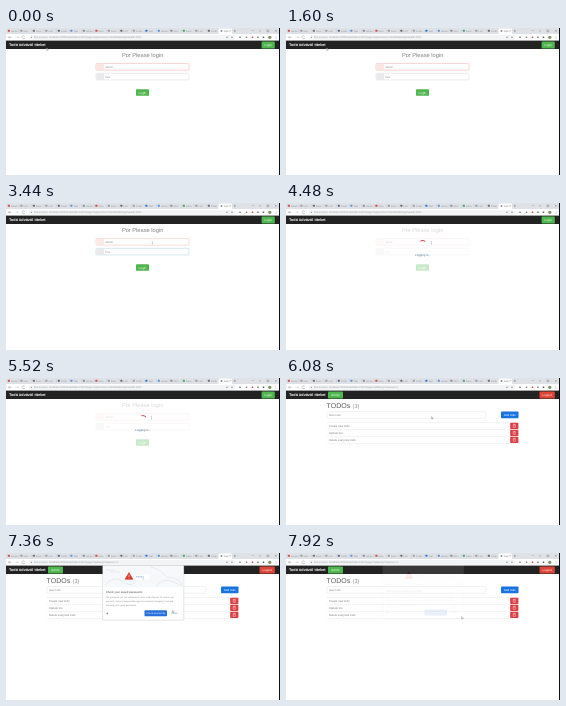
Write an HTML page that moves like this. It is 274 px wide and 147 px high and loops after 8 s.

```html
<!DOCTYPE html>
<html lang="en">
<head>
<meta charset="utf-8">
<title>Todo login</title>
<style>
html, body { margin: 0; width: 100%; height: 100%; overflow: hidden; background: #fff; }
svg { display: block; width: 100vw; height: 100vh; font-family: "Liberation Sans", Arial, sans-serif; text-rendering: geometricPrecision; }
</style>
</head>
<body>
<svg id="stage" viewBox="0 0 274 147"></svg>
<script>
const LOOP = 8000, STEP = 80;
const GREEN = '#4fb54f', RED = '#dc4538';
const stage = document.getElementById('stage');

const rect = (x, y, w, h, fill, more = '') =>
  `<rect x="${x}" y="${y}" width="${w}" height="${h}" fill="${fill}" ${more}/>`;
const dot = (x, y, r, fill, more = '') =>
  `<circle cx="${x}" cy="${y}" r="${r}" fill="${fill}" ${more}/>`;
const path = (d, color, width = 0.5, more = '') =>
  `<path d="${d}" fill="none" stroke="${color}" stroke-width="${width}" ${more}/>`;
const text = (x, y, size, fill, str, more = '') =>
  `<text x="${x}" y="${y}" font-size="${size}" fill="${fill}" ${more}>${str}</text>`;
const group = (id, body) => `<g id="${id}">${body}</g>`;
const mid = 'text-anchor="middle"';

function button(x, y, w, h, fill, label, size = 3) {
  return rect(x, y, w, h, fill, 'rx="0.9"') +
    text(x + w / 2, y + h / 2 + size * 0.36, size, '#fff', label, mid);
}

function browser() {
  const colors = ['#d64b40', '#9a9da2', '#6a6d72', '#9da2a8', '#5a6a80', '#5f93dc', '#8a8f95'];
  const labels = ['Home', 'Inbo', 'Docs', 'List', 'Code', 'Test'];
  let out = rect(0, 0, 274, 6, '#dee1e6') + rect(0, 6, 274, 7, '#fff');
  for (let i = 0; i < 17; i++) {
    const x = 1.9 + i * 12.5;
    const color = i === 11 ? '#3176d2' : i === 14 ? '#46a568' : colors[i % 7];
    out += rect(x, 1.7, 2, 2, color, 'rx="0.5"') +
      text(x + 3.2, 3.7, 2.4, '#8b9095', labels[i % 6]) +
      path(`M${x + 11.2} 1.3v3`, '#b4b8bd', 0.3);
  }
  out += rect(212.5, 0.6, 13.5, 5.8, '#fff', 'rx="1.2"') +
    dot(215.5, 2.9, 1, '#888d93') + text(217.5, 3.8, 2.4, '#777', 'Todo') +
    path('M223.6 2.1l1.4 1.4m0-1.4l-1.4 1.4', '#777', 0.35) +
    path('M227.7 2.9h2.2m-1.1-1.1v2.2', '#666', 0.4) +
    path('M246 2.2l.8 .8 .8-.8M253 2.9h2M261 2h1.8v1.8h-1.8zM269 2l1.8 1.8m0-1.8l-1.8 1.8', '#666', 0.35);
  out += path('M5.5 9.3h-3m1.2-1.2l-1.2 1.2 1.2 1.2', '#777', 0.4) +
    path('M9.4 9.3h3m-1.2-1.2l1.2 1.2-1.2 1.2', '#bbb', 0.4) +
    path('M18.8 8.5a1.4 1.4 0 1 0 .2 1.4', '#777', 0.4) +
    rect(23, 7, 206, 4.8, '#f1f3f4', 'rx="2.4"') + dot(25.4, 9.3, 0.6, '#888');
  out += group('urlLogin', text(28, 10.2, 2.65, '#9a9ea3',
      'Not secure | localhost:3000/todo/index.html?page=login&amp;return=/todo/list&amp;lang=hu&amp;id=1002')) +
    group('urlList', text(28, 10.2, 2.65, '#9a9ea3',
      'Not secure | localhost:3000/todo/index.html?page=list&amp;lang=hu&amp;user=1'));
  [[221, '#aaa'], [226, '#aaa'], [234, '#888'], [240.5, '#888'], [246.5, '#d8453d'], [252, '#777'], [257.5, '#555']]
    .forEach(([x, c]) => out += rect(x - 0.8, 8.5, 1.6, 1.6, c, 'rx="0.5"'));
  return out + dot(263.8, 9.3, 1.6, '#7c9264') +
    [8.2, 9.3, 10.4].map(y => dot(270, y, 0.3, '#666')).join('');
}

function navbar() {
  return rect(0, 12.6, 274, 8.4, '#222') +
    text(3, 18.4, 3.8, '#fff', 'Todó üdvözöl titeket', 'font-weight="bold"') +
    group('navLogin', button(255.6, 13.6, 13.2, 7, GREEN, 'Login')) +
    group('navUser', button(42, 13.6, 15, 7, GREEN, 'Admin') +
      button(253.5, 13.6, 15.3, 7, RED, 'Logout'));
}

function field(y, id, ghost, value) {
  return rect(90, y, 93, 6.6, '#fff', `id="${id}Box" stroke="#d8d8d8" stroke-width="0.5" rx="0.7"`) +
    rect(90.2, y + 0.2, 7.8, 6.2, '#eaeaec', `id="${id}Tag"`) +
    text(99.2, y + 4.3, 2.9, '#999', ghost, `id="${id}Hint"`) +
    text(99.2, y + 4.3, 2.9, '#888', value, `id="${id}Value"`);
}

function login() {
  return group('login',
    text(136.6, 28.8, 5.7, '#808080', 'Por Please login', mid) +
    field(35.6, 'user', 'admin', 'admin') + field(45.3, 'pass', 'Pas', '') +
    button(130, 61.2, 13, 6.6, GREEN, 'Login', 3.2) +
    group('busy', rect(0, 21, 274, 126, '#fff', 'opacity="0.7"') +
      path('M135.4 37.7a4.5 4.5 0 0 1 4.7 1.4', '#d33a3a', 0.9, 'id="spinner"') +
      text(137, 53.3, 2.9, '#48708f', 'Logging in...', mid)));
}

function list() {
  const items = ['Create new todo', 'Update me', 'Delete everyone todo'];
  let out = text(40.6, 29.6, 7, '#5c5c5c', 'TODOs') + text(66.6, 29.6, 5.5, '#8c8c8c', '(3)') +
    rect(41, 33.6, 159, 6.6, '#fff', 'stroke="#ddd" stroke-width="0.4" rx="0.6"') +
    text(43, 37.9, 2.8, '#888', 'New todo') +
    button(215, 33.4, 17.5, 6.8, '#1673e0', 'Add todo', 3);
  items.forEach((item, i) => {
    const y = 44.6 + i * 7;
    out += path(`M41 ${y}H232.5`, '#ddd', 0.35) + text(43, y + 4.4, 2.8, '#777', item) +
      rect(224.2, y + 0.2, 8.2, 6.3, '#dc3f43', 'rx="0.8"') +
      path(`M227.3 ${y + 2.4}h2v2.4h-2zM226.8 ${y + 1.8}h3`, '#fff', 0.4);
  });
  return group('list', out + path('M41 65.6H232.5', '#ddd', 0.35));
}

function popup() {
  const lines = [
    'The password you just used was found in a data breach. To secure your',
    'accounts, Velora Password Manager recommends changing it now and',
    'checking your saved passwords.'
  ];
  return group('popup',
    rect(96.2, 12.8, 82, 54.8, '#000', 'rx="1.5" opacity="0.1"') +
    rect(96.7, 12.4, 81, 54.5, '#fff', 'rx="1.2" stroke="#ccc" stroke-width="0.3"') +
    rect(97, 12.7, 80.4, 21.6, '#f7f8fa') +
    path('M99 32q9-10 17-4t12 2M145 14l8 3 8 7 8 1 8 6M150 33q8-9 18-4l9 4M100 17h9m-5 2h10', '#d5dae1', 0.5) +
    '<path d="M123 19.6l3.9 6.7h-7.8z" fill="#db372d" stroke="#db372d" stroke-width="0.6" stroke-linejoin="round"/>' +
    path('M123 21.7v2.3m0 .7v.7', '#fff', 0.6) +
    rect(128, 21.6, 16, 4.8, '#fff', 'rx="2.4"') +
    text(130, 26, 4.2, '#6284b8', '****|') +
    text(99.8, 39.6, 2.8, '#444', 'Check your saved passwords') +
    lines.map((s, i) => text(99.8, 45.2 + i * 3.9, 2.15, '#888', s)).join('') +
    dot(101.3, 60.4, 0.9, '#999') +
    button(138.5, 57.3, 22.5, 6, '#2770dc', 'Check passwords', 2.4) +
    text(168.2, 61.2, 2.4, '#557fc0', 'Close', mid));
}

stage.innerHTML = rect(0, 0, 274, 147, '#fff') + browser() + navbar() + login() + list() + popup() +
  '<path id="arrow" d="M0 0v2.4l.6-.5 .4 .8 .5-.2-.4-.8h.8z" fill="#fff" stroke="#444" stroke-width="0.25"/>' +
  path('M0 0v2.6m-.5 0h1m-1-2.6h1', '#777', 0.3, 'id="beam"') +
  rect(273, 0, 1, 147, '#111');

const el = id => document.getElementById(id);
const show = (id, on) => el(id).setAttribute('display', on ? 'inline' : 'none');
const set = (id, name, value) => el(id).setAttribute(name, value);
const ramp = (t, a, b) => Math.max(0, Math.min(1, (t - a) / (b - a)));
const ease = p => p * p * (3 - 2 * p);

// time, x, y
const moves = [[0, 40.5, 19.8], [2080, 40.5, 19.8], [2880, 146.4, 38.5], [3760, 146.4, 38.5],
  [4480, 145.4, 38.5], [6640, 145.4, 38.5], [7280, 166, 56], [7480, 167, 59], [7840, 175.5, 63.5], [8000, 175.5, 63.5]];

function pointer(t) {
  const i = moves.findIndex(m => m[0] > t);
  const a = moves[i - 1], b = moves[i];
  const p = ease(ramp(t, a[0], b[0]));
  return `translate(${a[1] + (b[1] - a[1]) * p} ${a[2] + (b[2] - a[2]) * p})`;
}

function draw(t) {
  const inside = t >= 5760, busy = t >= 4400, typed = t >= 2640;
  const overField = t >= 2800 && !inside;
  const chars = Math.floor(5 * ramp(t, 3680, 4240));
  show('login', !inside);
  show('navLogin', !inside);
  show('urlLogin', !inside);
  show('list', inside);
  show('navUser', inside);
  show('urlList', inside);
  show('busy', busy);

  set('userBox', 'stroke', typed ? '#eebcb8' : '#f2aaa6');
  set('userTag', 'fill', typed ? '#fbe9e8' : '#fce6e4');
  set('passBox', 'stroke', typed && !busy ? '#a5cfea' : '#d8d8d8');
  show('userHint', !typed);
  show('userValue', typed);
  show('passHint', chars === 0);
  el('passValue').textContent = '•'.repeat(chars);

  set('spinner', 'transform', `rotate(${(t - 5520) * 0.36} 136.6 42)`);
  const fade = ramp(t, 6530, 6800) * (1 - ramp(t, 7720, 7943));
  set('popup', 'opacity', fade);
  set('popup', 'transform', `translate(0 ${(fade - 1) * 0.9})`);
  show('arrow', !overField);
  show('beam', overField);
  set('arrow', 'transform', pointer(t));
  set('beam', 'transform', pointer(t));
}

function tick(now) {
  draw(Math.floor((now - start) % LOOP / STEP) * STEP);
  requestAnimationFrame(tick);
}
const start = performance.now();
draw(0);
requestAnimationFrame(t => tick(Math.max(t, start)));
</script>
</body>
</html>
```
